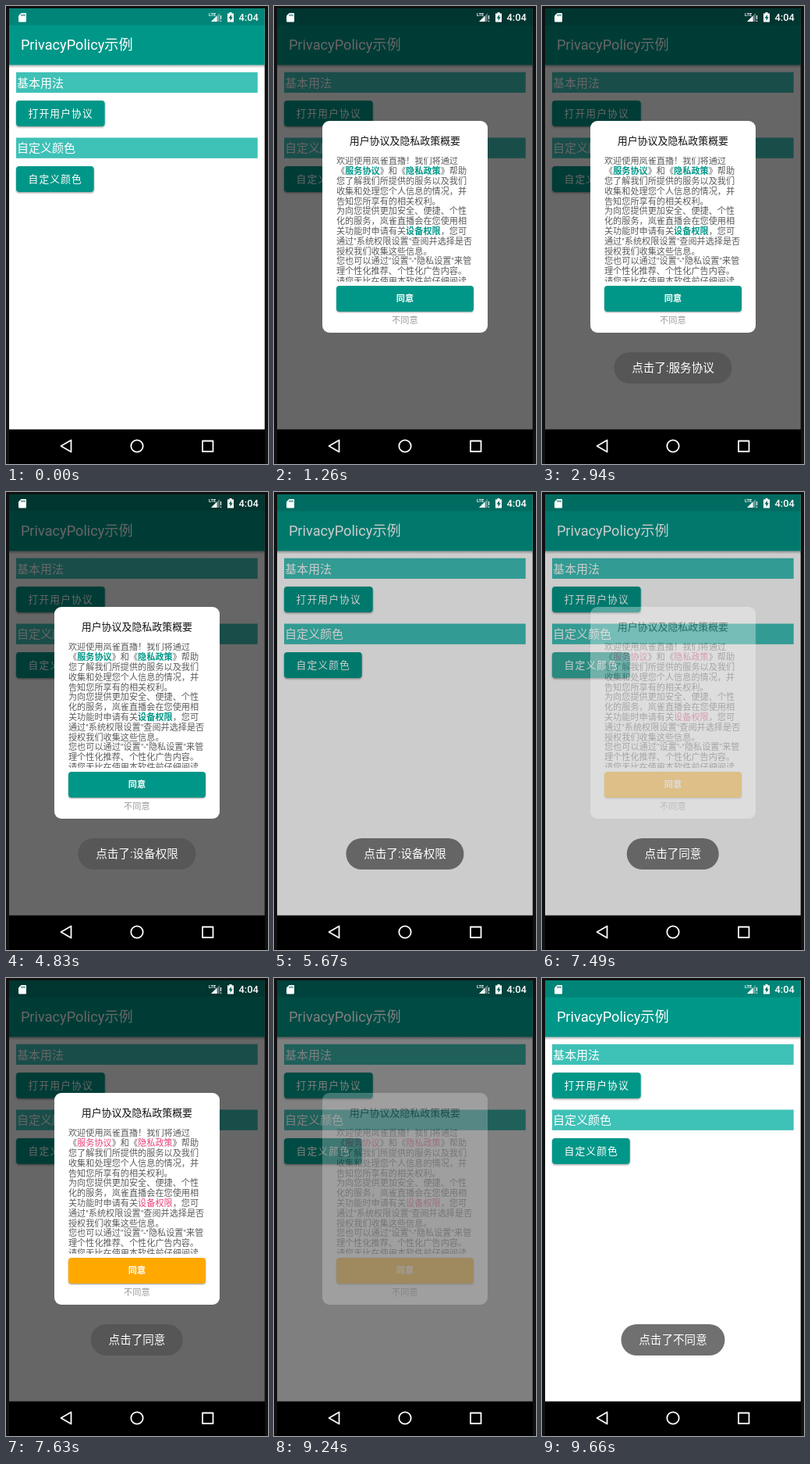
These frames come from a looping animation (336x586 px, 9.73 s). An HTML page:

```html
<!DOCTYPE html>
<html lang="zh-CN">
<head>
<meta charset="utf-8">
<title>PrivacyPolicy示例</title>
<style>
  html, body { margin: 0; width: 100%; height: 100%; overflow: hidden; background: #111; }
  body, text { font-family: Roboto, "Noto Sans CJK SC", "Noto Sans CJK", sans-serif; }
  body { text-spacing-trim: space-all; }
  #stage { position: absolute; left: 0; top: 0; width: 336px; height: 586px; overflow: hidden; }
  #stage > * { position: absolute; }
  svg { left: 0; top: 0; }

  #dim { left: 4px; top: 3px; width: 328px; height: 539px; background: #000; opacity: 0; }

  #dialog {
    --accent: #009788; --link: #009788; --weight: 700;
    left: 61.6px; top: 147.4px; width: 212.6px; height: 270.6px;
    border-radius: 9px; background: #fff; opacity: 0;
  }
  #dialog.warm { --accent: #ffa800; --link: #e8407c; --weight: 400; }
  #dialog > * { position: absolute; left: 0; width: 100%; text-align: center; }
  #dialog .head { top: 14.6px; font-size: 12.95px; line-height: 21px; color: #111; }
  #dialog .body {
    left: 18.4px; top: 46px; width: 180px; height: 159.6px; overflow: hidden;
    font-size: 11.15px; line-height: 12.8px; white-space: pre; text-align: left; color: #5c5c5c;
  }
  #dialog b { color: var(--link); font-weight: var(--weight); }
  #dialog .agree {
    left: 18.2px; top: 210.6px; width: 176.4px; height: 33px; border-radius: 4px;
    background: var(--accent); box-shadow: 0 1px 2px #0006;
    font-size: 11.2px; line-height: 33px; font-weight: 700; color: #fff;
  }
  #agreePress { position: absolute; inset: 0; border-radius: 4px; background: #fff; opacity: 0; }
  #dialog .refuse { top: 244.6px; font-size: 11.2px; line-height: 21px; color: #9a9a9a; }

  .toast {
    left: 168px; top: 443px; height: 40px; padding: 0 22.8px; transform: translateX(-50%);
    border-radius: 20px; background: rgba(84, 84, 84, .86); opacity: 0;
    font-size: 14.58px; line-height: 41px; white-space: nowrap; color: #fff;
  }
</style>
</head>
<body>
<div id="stage">
  <svg width="336" height="586" fill="#fff">
    <defs>
      <linearGradient id="shade" x2="0" y2="1">
        <stop stop-color="#000" stop-opacity=".28"/>
        <stop offset="1" stop-color="#000" stop-opacity="0"/>
      </linearGradient>
      <filter id="drop" x="-10%" y="-20%" width="120%" height="150%">
        <feDropShadow dx="0" dy="1.2" stdDeviation="1" flood-opacity=".4"/>
      </filter>
    </defs>
    <rect x="4" y="3" width="327.7" height="539"/>
    <rect x="4" y="3" width="327.7" height="22" fill="#008578"/>
    <rect x="4" y="24.5" width="327.7" height="51" fill="#009788"/>
    <rect x="4" y="75.5" width="327.7" height="4" fill="url(#shade)"/>
    <text x="18.9" y="56.4" font-size="18.2">PrivacyPolicy示例</text>

    <g fill="#3ec1b7">
      <rect x="13" y="84.700" width="309.700" height="26.300"/>
      <rect x="13" y="168.500" width="309.700" height="26.300"/>
    </g>
    <g font-size="15">
      <text x="14" y="103.5">基本用法</text>
      <text x="14" y="187">自定义颜色</text>
    </g>

    <g fill="#009788" filter="url(#drop)">
      <rect x="13" y="121" width="113.7" height="33" rx="4"/>
      <rect x="13" y="205" width="99.7" height="33" rx="4"/>
    </g>
    <rect id="press1" x="13" y="121" width="113.7" height="33" rx="4" opacity="0"/>
    <rect id="press2" x="13" y="205" width="99.7" height="33" rx="4" opacity="0"/>
    <g font-size="12.75" letter-spacing="1.14">
      <text x="28.5" y="142.3">打开用户协议</text>
      <text x="28.5" y="226.3">自定义颜色</text>
    </g>
  </svg>

  <div id="dim"></div>

  <svg width="336" height="586" fill="#fff">
    <path d="M19.5 9H25q1 0 1 1v9.500q0 1-1 1H17q-1 0-1-1V12.500z"/>
    <path d="M20 10.500v2.500M22 10.500v2.500M24 10.500v2.500" stroke="#00665c"/>
    <text x="260" y="13" font-size="5.600" font-weight="700">LTE</text>
    <path d="M274 9v11h-11z" opacity=".35"/>
    <path d="M270.500 12.500V20H263z"/>
    <path d="M275.500 12v5M275.500 18.500v1.500" stroke="#fff" stroke-width="1.200"/>
    <path d="M286.500 8h3v1.500H292V20.500h-8V9.500h2.500z"/>
    <path d="M289 11l-3.500 4.500h2V19l3.300-4.700h-1.800z" fill="#00665c"/>
    <text x="298.500" y="19.300" font-size="12.800" font-weight="500">4:04</text>

    <rect x="4" y="541.700" width="328" height="44.300" fill="#000"/>
    <g fill="none" stroke="#fff" stroke-width="1.800" stroke-linejoin="round">
      <path d="M83.500 555.500v15l-13-7.500z"/>
      <circle cx="168" cy="563" r="7.700"/>
      <rect x="252" y="556.500" width="13.500" height="13.500"/>
    </g>
  </svg>

  <div id="dialog">
    <div class="head">用户协议及隐私政策概要</div>
    <div class="body">欢迎使用岚雀直播！我们将通过
《<b>服务协议</b>》和《<b>隐私政策</b>》帮助
您了解我们所提供的服务以及我们
收集和处理您个人信息的情况，并
告知您所享有的相关权利。
为向您提供更加安全、便捷、个性
化的服务，岚雀直播会在您使用相
关功能时申请有关<b>设备权限</b>，您可
通过"系统权限设置"查阅并选择是否
授权我们收集这些信息。
您也可以通过"设置"-"隐私设置"来管
理个性化推荐、个性化广告内容。
请您无比在使用本软件前仔细阅读</div>
    <div class="agree">同意<i id="agreePress"></i></div>
    <div class="refuse">不同意</div>
  </div>
</div>

<script>
  const LOOP = 9730, TICK = 70;
  const $ = id => document.getElementById(id);
  const clamp = v => Math.min(1, Math.max(0, v));

  // Opacity per element as [ms, value] points
  const tracks = {
    dim: [[700, 0], [980, .6], [5390, .6], [5810, 0], [7420, 0], [7630, .6], [9170, .6], [9590, 0]],
    dialog: [[700, 0], [910, 1], [5390, 1], [5483, 0], [7420, 0], [7630, 1], [9170, 1], [9263, 0]],
    press1: [[700, 0], [770, .2], [980, .2], [1260, 0]],
    press2: [[7280, 0], [7350, .2], [7490, .2], [7630, 0]],
    agreePress: [[5250, 0], [5320, .2], [5460, .2], [5600, 0]]
  };

  // Text, show time, hide time, fade-out length
  const toasts = [
    ['点击了:服务协议', 2310, 4480, 280],
    ['点击了:设备权限', 4480, 6580, 490],
    ['点击了同意', 6580, 8610, 490],
    ['点击了不同意', 9310, LOOP, 490]
  ].map(([text, show, hide, fade]) => {
    const el = document.createElement('div');
    el.className = 'toast';
    el.textContent = text;
    $('stage').append(el);
    return { el, show, hide, fade };
  });

  function valueAt(points, t) {
    const next = points.findIndex(p => p[0] > t);
    if (next < 0) return points[points.length - 1][1];
    if (next === 0) return points[0][1];
    const [t0, a] = points[next - 1], [t1, b] = points[next];
    return a + (b - a) * (t - t0) / (t1 - t0);
  }

  function toastAlpha({ show, hide, fade }, t) {
    const enter = clamp((t - show) / 420), leave = clamp((t - hide) / fade);
    return (1 - (1 - enter) ** 2) * (1 - leave ** 2);
  }

  function draw(now) {
    const t = Math.floor(now % LOOP / TICK) * TICK;
    for (const id in tracks) $(id).style.opacity = valueAt(tracks[id], t);
    $('dialog').classList.toggle('warm', t > 6500);
    for (const toast of toasts) toast.el.style.opacity = toastAlpha(toast, t);
  }

  const start = performance.now();
  function loop() {
    draw(performance.now() - start);
    requestAnimationFrame(loop);
  }
  loop();
</script>
</body>
</html>
```
